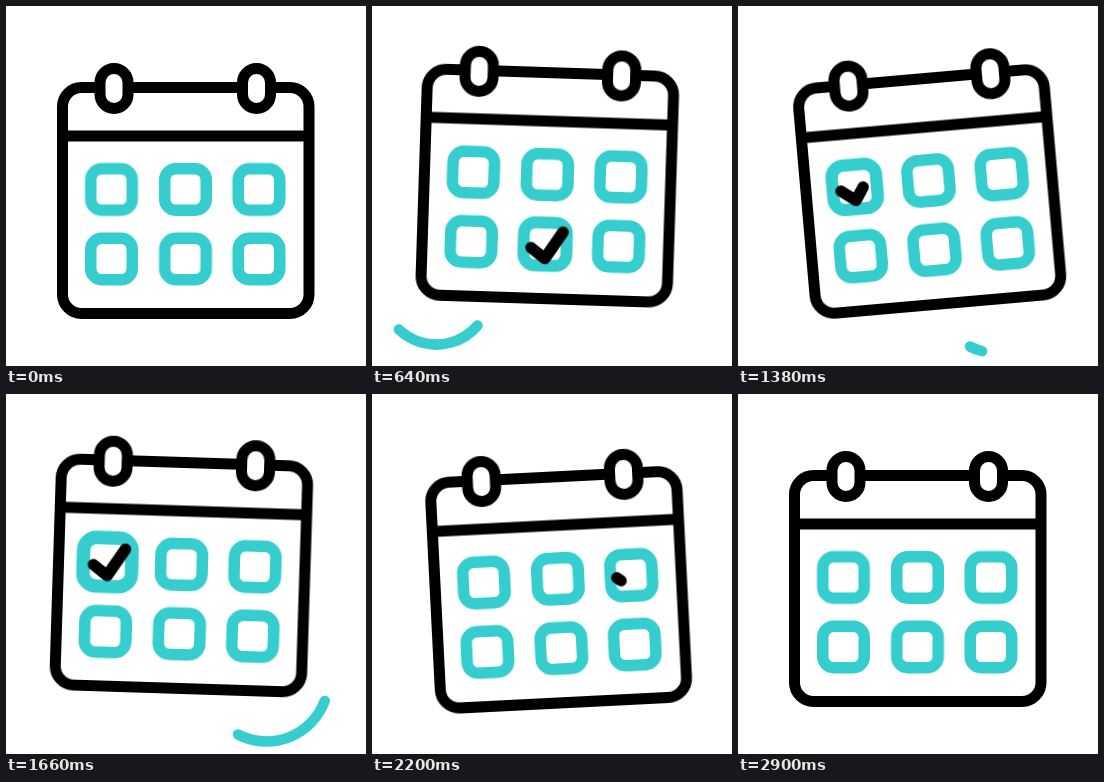
An HTML page that plays this animation: 360x360 px, repeating every 3.42 s.

```html
<!DOCTYPE html>
<html lang="en">
<head>
<meta charset="utf-8">
<title>Calendar</title>
<style>
  /* Visible span of a trimmed stroke, in percent of its length */
  @property --from { syntax: "<number>"; inherits: false; initial-value: -1; }
  @property --to { syntax: "<number>"; inherits: false; initial-value: -1; }

  html, body { margin: 0; width: 100%; height: 100%; overflow: hidden; background: #fff; }
  svg { display: block; width: 100vw; height: 100vh; }

  .hop, .swing, .pop, .trim {
    animation: 3420ms cubic-bezier(.333, 0, .667, 1) infinite;
  }
  .hop { animation-name: hop; }
  .swing { animation-name: swing; transform-origin: 179.5px 57px; }
  .pop { transform-origin: 0 0; }

  .ink, .teal { fill: none; stroke-width: 11; }
  .ink { stroke: #000; }
  .teal { stroke: #35cdce; }
  .ring { fill: #fff; }
  .cell { stroke-width: 11.5; }
  .trim {
    stroke-width: 10.5;
    stroke-linecap: round;
    stroke-linejoin: round;
    stroke-dasharray: max(0px, (var(--to) - var(--from)) * 1px) 900px;
    stroke-dashoffset: calc(var(--from) * -1px);
  }
  .check { animation-name: check; stroke-width: 11.5; }
  .left { animation-name: left; }
  .right { animation-name: right; }

  @keyframes hop {
    0%, 7% { transform: translateY(0); }
    18.7% { transform: translateY(-14.8px); }
    28.7%, 35.4% { transform: translateY(0); }
    45% { transform: translateY(-16px); }
    59.1% { transform: translateY(3px); }
    69.6%, 100% { transform: translateY(0); }
  }
  @keyframes swing {
    0%, 14% { transform: rotate(0); }
    25.5% { transform: rotate(5deg); }
    40.1% { transform: rotate(-5deg); }
    53.8% { transform: rotate(5.1deg); }
    68.9% { transform: rotate(-5.1deg); }
    78.9%, 100% { transform: rotate(0); }
  }
  @keyframes check {
    0% { --from: -1; --to: -1; }
    5.85% { --to: 101; }
    16.1% { --from: -1; }
    21.6%, 100% { --from: 101; --to: 101; }
  }
  @keyframes left {
    0% { --from: -1; --to: -1; }
    8.8% { --to: -1; }
    21.6% { --from: -1; }
    24.6% { --to: 101; }
    37.7%, 100% { --from: 101; --to: 101; }
  }
  @keyframes right {
    0% { --from: -1; --to: -1; }
    37.1% { --to: -1; }
    48.4% { --from: -1; }
    53.1% { --to: 101; }
    64.2%, 100% { --from: 101; --to: 101; }
  }
  @keyframes pop1 {
    0%, 17%, 34.5%, 100% { transform: scale(1); }
    22.8%, 28.7% { transform: scale(1.17); }
  }
  @keyframes pop2 {
    0%, 38%, 56.7%, 100% { transform: scale(1); }
    43.3%, 50.9% { transform: scale(1.17); }
  }
  @keyframes pop3 {
    0%, 63.7%, 77.2%, 100% { transform: scale(1); }
    69%, 69.6% { transform: scale(1.17); }
  }
</style>
</head>
<body>
<svg viewBox="0 0 360 360">
  <defs>
    <rect id="cell" class="teal cell" x="-20.75" y="-20.75" width="41.5" height="41.5" rx="11"/>
    <rect id="ring" class="ink ring" x="-14" y="-20" width="28" height="40" rx="14"/>
  </defs>

  <path class="teal trim left" pathLength="100" d="M105.5 319.5A54 54 0 0 1 10.5 289"/>
  <path class="teal trim right" pathLength="100" d="M232 340.5A62 62 0 0 0 322.5 283"/>

  <g class="hop"><g class="swing">
    <rect class="ink" x="56.5" y="81.5" width="246.5" height="226" rx="19"/>
    <path class="ink" d="M56.5 130H303"/>
    <use href="#ring" x="108" y="82.5"/>
    <use href="#ring" x="250.5" y="82.5"/>

    <use href="#cell" x="179.5" y="183.5"/>
    <use href="#cell" x="105.5" y="253"/>
    <use href="#cell" x="253" y="253"/>

    <g transform="translate(179.5 253)">
      <g class="pop" style="animation-name: pop1"><use href="#cell"/></g>
      <path class="ink trim check" style="animation-delay: 440ms" pathLength="100" d="M-14 4L0 14.5L17.5 -12.5"/>
    </g>
    <g transform="translate(105.5 183.5)">
      <g class="pop" style="animation-name: pop2"><use href="#cell"/></g>
      <path class="ink trim check" style="animation-delay: 1260ms" pathLength="100" d="M-14 3L0 13.5L17.5 -13.5"/>
    </g>
    <g transform="translate(253 183.5)">
      <g class="pop" style="animation-name: pop3"><use href="#cell"/></g>
      <path class="ink trim check" style="animation-delay: 2160ms" pathLength="100" d="M-14.5 2L-.5 12.5L17 -14.5"/>
    </g>
  </g></g>
</svg>
</body>
</html>
```
